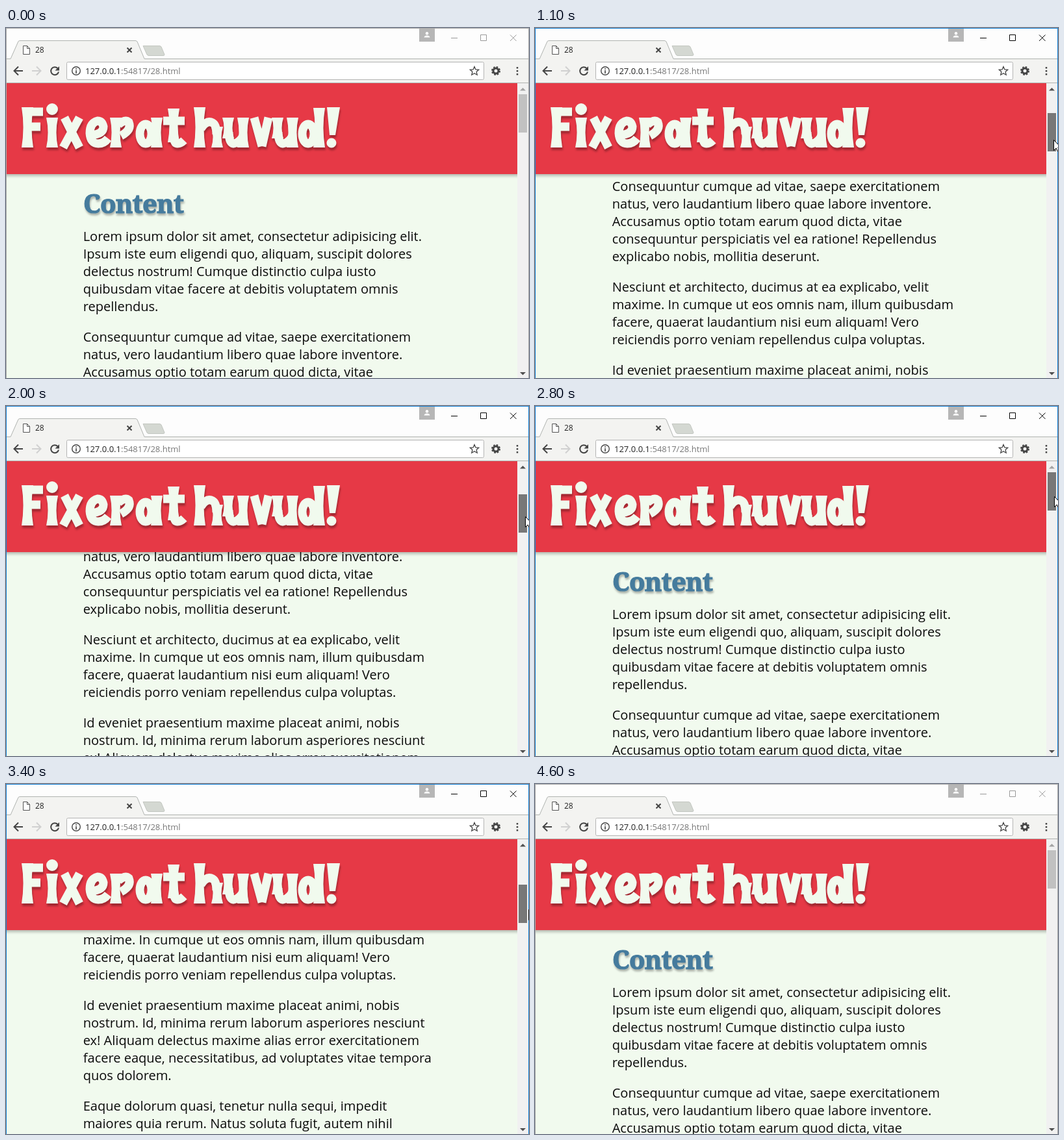
Write an HTML page that moves like this. It is 805x539 px and loops after 4.7 s.

```html
<!DOCTYPE html>
<html lang="sv">
<head>
<meta charset="utf-8">
<title>28</title>
<style>
html, body { margin: 0; width: 100%; height: 100%; overflow: hidden; background: #fff; }
svg { display: block; }
text { font-family: "Open Sans", sans-serif; white-space: pre; }
.line { fill: none; stroke: #444; stroke-width: 2; }
#copy { font-size: 20px; letter-spacing: .02px; fill: #0a0a0a; }
#heading { font: 900 40px "Noto Serif", serif; letter-spacing: -.8px; fill: #457b9d; stroke: #457b9d;
  stroke-width: 1.2px; filter: drop-shadow(1px 3px 1.5px rgba(0,0,0,.3)); }
#banner { fill: #e63946; filter: drop-shadow(0 3px 2px rgba(0,0,0,.25)); }
#title { fill: #f1faee; filter: drop-shadow(1px 4px 1.5px rgba(0,0,0,.3)); }
#title .pen { fill: none; stroke: #f1faee; stroke-width: 13px; }
</style>
</head>
<body>
<svg width="805" height="539" viewBox="0 0 805 539">
  <defs><clipPath id="view"><path d="M1 85H787V539H1z"/></clipPath></defs>

  <!-- browser window -->
  <path fill="#fdfdfd" d="M0 0H805V48H0z"/>
  <path fill="#f3f3f1" stroke="#b0b3b0" d="M-1 47.5H7L19 20.5Q20 19.5 22 19.5H199Q201 19.5 202 21L213 47.5H806V84.5H-1z"/>
  <path fill="#d4d8d2" stroke="#c2c6c0" d="M211 27.5H236Q238 27.5 239 29L244 41Q244 42.5 242 42.5H220Q218 42.5 217 41z"/>
  <path fill="#fff" stroke="#555" d="M26.5 27.5H32.5L36.5 31.5V40.5H26.5zM32.5 27.5V31.5H36.5"/>
  <text x="45" y="38" font-size="12" fill="#222">28</text>
  <path class="line" d="M186.5 30.5l7 7m0-7l-7 7"/>
  <path fill="#b6b6b6" d="M636 0H660V21H636z"/>
  <path fill="#fff" d="M648 6a2.3 2.3 0 1 1-.01 0zM643.5 14.5Q644 11.5 648 11.5T652.5 14.5z"/>
  <path id="controls" fill="none" d="M685 15.5H695M730.5 10.5h9v9h-9zM776 10.5l9.500 9.500m0-9.500l-9.500 9.500"/>

  <!-- toolbar -->
  <path class="line" d="M26 66H13M19 59.5L12.5 66L19 72.5"/>
  <path class="line" style="stroke:#d0d0d0" d="M40 66H53M47 59.5L53.5 66L47 72.5"/>
  <path class="line" d="M79.5 62A6 6 0 1 0 81 67.5"/>
  <path fill="#444" d="M82 59V65.5H75.5z"/>
  <rect x="93.5" y="52.5" width="642" height="27" rx="2" fill="#fff" stroke="#b4b4b4"/>
  <circle class="line" style="stroke-width:1.4" cx="108" cy="66" r="6.3"/>
  <path class="line" style="stroke-width:1.6" d="M108 65V70M108 62V63.7"/>
  <text x="122" y="71" font-size="13" fill="#222">127.0.0.1<tspan fill="#777">:54817/28.html</tspan></text>
  <path class="line" style="stroke-width:1.3" d="M721 59.5l1.9 4.4 4.800.4-3.600 3.200 1.100 4.700-4.200-2.500-4.200 2.500 1.100-4.700-3.600-3.200 4.800-.4z"/>
  <circle class="line" style="stroke-width:3" cx="754" cy="66" r="4"/>
  <circle class="line" style="stroke-width:2" cx="754" cy="66" r="6" stroke-dasharray="2.6 2.112"/>
  <path class="line" style="stroke-width:2.5" stroke-dasharray="2.5" d="M787 60V72.5"/>

  <!-- page -->
  <g clip-path="url(#view)">
    <path fill="#f1faee" d="M1 85H787V539H1z"/>
    <g id="page">
      <text id="heading" x="119" y="285">Content</text>
      <g id="copy"></g>
    </g>
    <path id="banner" d="M-9 75H797V225H-9z"/>
    <g id="title" role="img" aria-label="Fixerat huvud!"></g>
  </g>

  <!-- scrollbar -->
  <path fill="#f1f1f1" d="M787 85H805V539H787z"/>
  <path id="up" d="M791 96.5l4.5-4.5 4.5 4.5z"/>
  <path fill="#505050" d="M791 530l4.5 4.5 4.5-4.5z"/>
  <rect id="thumb" x="789" width="13" height="59"/>
  <rect id="edge" x=".5" y=".5" width="804" height="545" fill="none"/>
  <path id="cursor" fill="#fff" stroke="#000" d="M.5 .5V16.5L4.2 13L7 18.5L9.3 17.5L6.7 12H11.5z"/>
</svg>
<script>
const $ = id => document.getElementById(id);

const paragraphs = [
  `Lorem ipsum dolor sit amet, consectetur adipisicing elit.
Ipsum iste eum eligendi quo, aliquam, suscipit dolores
delectus nostrum! Cumque distinctio culpa iusto
quibusdam vitae facere at debitis voluptatem omnis
repellendus.`,
  `Consequuntur cumque ad vitae, saepe exercitationem
natus, vero laudantium libero quae labore inventore.
Accusamus optio totam earum quod dicta, vitae
consequuntur perspiciatis vel ea ratione! Repellendus
explicabo nobis, mollitia deserunt.`,
  `Nesciunt et architecto, ducimus at ea explicabo, velit
maxime. In cumque ut eos omnis nam, illum quibusdam
facere, quaerat laudantium nisi eum aliquam! Vero
reiciendis porro veniam repellendus culpa voluptas.`,
  `Id eveniet praesentium maxime placeat animi, nobis
nostrum. Id, minima rerum laborum asperiores nesciunt
ex! Aliquam delectus maxime alias error exercitationem
facere eaque, necessitatibus, ad voluptates vitae tempora
quos dolorem.`,
  `Eaque dolorum quasi, tenetur nulla sequi, impedit
maiores quia rerum. Natus soluta fugit, autem nihil`
];
let baseline = 328;
for (const paragraph of paragraphs) {
  for (const line of paragraph.split("\n")) {
    $("copy").innerHTML += `<text x="118.7" y="${baseline}">${line}</text>`;
    baseline += 27;
  }
  baseline += 20;
}

// Display lettering: flared posts and dots are filled, the rest is drawn with a pen.
const BASE = 62, XTOP = 16;
function post(x, top = XTOP, bottom = BASE, w = 9) {
  const h = bottom - top;
  return `M${x - w} ${top}h${2 * w}q-5 ${h / 2} 0 ${h}h${-2 * w}q5 ${-h / 2} 0 ${-h}z`;
}
const dot = (x, y, r) => `M${x - r} ${y}a${r} ${r} 0 1 0 ${2 * r} 0a${r} ${r} 0 1 0 ${-2 * r} 0z`;
const bowl = "M7 41a9 15 0 1 0 18 0a9 15 0 1 0-18 0z";

// letter: [advance, filled shapes, pen strokes]
const glyphs = {
  F: [39, post(11, 0), "M14 7H35M14 30H31"],
  i: [21, post(10) + dot(10, 3, 9), ""],
  x: [40, "", "M8 16L31 62M31 16L6 62"],
  e: [38, "", "M7 43Q28 42 28 30Q26 21 19 21Q7 24 7 40Q8 56 20 56Q29 56 35 48"],
  r: [39, post(9), "M13 27Q23 18 29 23Q34 35 17 44"],
  a: [42, post(33), bowl],
  t: [34, post(17, 2, 54), "M1 21H34M17 46Q18 56 23 56Q28 56 33 51"],
  " ": [14, "", ""],
  h: [44, post(9, 0) + post(36, 30), "M11 33Q20 19 29 24Q35 27 35 42"],
  u: [40, post(9, XTOP, 48) + post(32), "M10 38Q10 55 17 56Q26 55 32 44"],
  v: [36, "", "M9 16L21 60M31 16L21 60"],
  d: [44, post(33, 1), bowl],
  "!": [21, "M1 0h20l-7 43h-9z" + dot(8, 55, 7.5), ""]
};
let pen = 22;
for (const letter of "Fixerat huvud!") {
  const [advance, solid, strokes] = glyphs[letter];
  $("title").innerHTML += `<g transform="translate(${pen} 122)"><path d="${solid}"/><path class="pen" d="${strokes}"/></g>`;
  pen += advance;
}

function ease(t, from, to) {
  const u = Math.min(1, Math.max(0, (t - from) / (to - from)));
  return u * u * (3 - 2 * u);
}
// Distance the thumb is dragged: down and up, twice.
const drag = t => 54 * (ease(t, 700, 1450) - ease(t, 1780, 2330) + ease(t, 2800, 3400) - ease(t, 3590, 4080));
const cursorX = t => 806 - 8 * ease(t, 100, 400) + ease(t, 1100, 2000) +
  5 * ease(t, 2800, 3200) - 2 * ease(t, 3400, 3800) + 10 * ease(t, 4000, 4200);
// The thumb trails the cursor slightly; between the drags the hand drifts up and back.
const cursorY = t => 139 + drag(t + 30) - 12 * (ease(t, 2200, 2300) - ease(t, 2300, 2500));

const LOOP = 4700, STEP = 100;
function draw() {
  const t = Math.floor(performance.now() % LOOP / STEP) * STEP;
  const pull = Math.round(drag(t));
  const active = t >= 600 && t < 4600;
  const pressed = t >= 700 && t < 4300;
  const hover = t >= 400 && t < 700;

  $("page").setAttribute("transform", `translate(0 ${-Math.round(pull * 7.735)})`);
  $("thumb").setAttribute("y", 102 + Math.round(pull * .975));
  $("thumb").setAttribute("fill", pressed ? "#787878" : hover ? "#a8a8a8" : "#c1c1c1");
  $("up").setAttribute("fill", pull ? "#505050" : "#a3a3a3");
  $("edge").setAttribute("stroke", active ? "#1883d7" : "#aaa");
  $("controls").setAttribute("stroke", active ? "#000" : "#999");
  $("cursor").setAttribute("transform", `translate(${Math.round(cursorX(t))} ${Math.round(cursorY(t))})`);
  requestAnimationFrame(draw);
}
draw();
</script>
</body>
</html>
```
